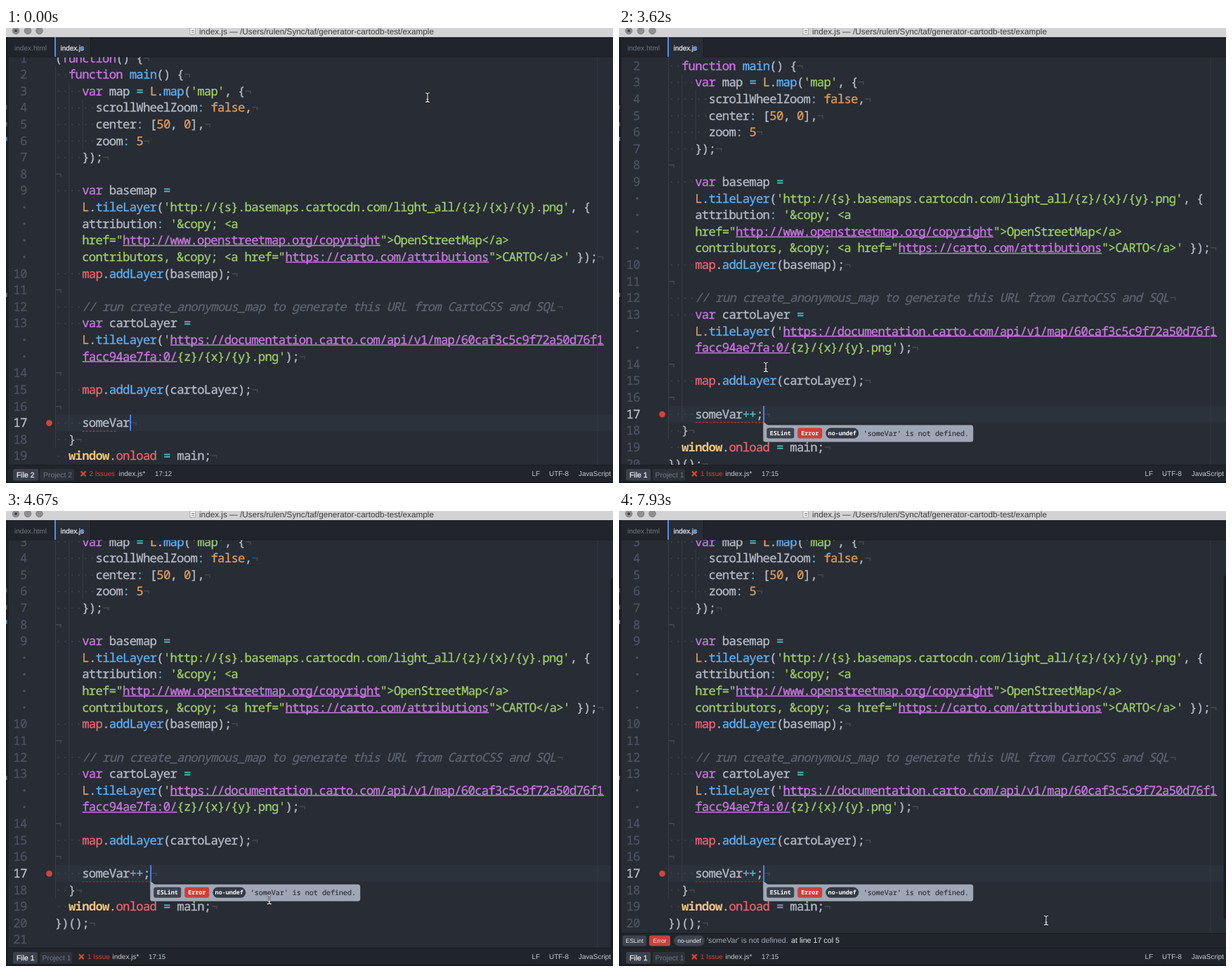
An HTML page that plays this animation: 864 by 648 pixels, repeating every 8000 ms.

```html
<!DOCTYPE html>
<html lang="en">
<head>
<meta charset="utf-8">
<title>Linting in an editor</title>
<style>
html, body { margin: 0; width: 100%; height: 100%; overflow: hidden; background: #282c34; }
svg { display: block; width: 864px; height: 648px; }
text { white-space: pre; text-rendering: geometricPrecision; font-family: "Liberation Sans", Arial, sans-serif; }
.code { font: 500 17.3px "Noto Sans Mono", "DejaVu Sans Mono", monospace; letter-spacing: -0.735px; stroke-width: .35px; }
.note { font-style: italic; }
.strong { font-weight: 700; stroke-width: 0; }
.mono { font-family: "Noto Sans Mono", "DejaVu Sans Mono", monospace; }
</style>
</head>
<body>
<svg id="stage" viewBox="0 0 864 648" xmlns="http://www.w3.org/2000/svg"></svg>
<script>
const NS = "http://www.w3.org/2000/svg";
const LOOP = 8000, COL = 9.645, LEFT = 70, ROW = 23.62, TOP = 42.6, ACTIVE = 22;
const INK = { w: "#b4bbc7", p: "#c678dd", b: "#61afef", c: "#56b6c2", g: "#9dcb6c",
  o: "#da9c60", r: "#e9656f", y: "#ecc47b", k: "#5c6370", u: "#c678dd" };
const STYLE = { k: "code note", y: "code strong" };
const FAINT = "#424852";

function add(parent, tag, attrs, content) {
  const el = document.createElementNS(NS, tag);
  for (const k in attrs) el.setAttribute(k, attrs[k]);
  if (content !== undefined) el.textContent = content;
  parent.appendChild(el);
  return el;
}
const rect = (p, x, y, width, height, fill, rx = 0) => add(p, "rect", { x, y, width, height, fill, rx });
const label = (p, x, y, size, fill, str, extra) => add(p, "text", { x, y, "font-size": size, fill, ...extra }, str);
const line = (p, x1, y1, x2, y2, stroke, w = 1) => add(p, "line", { x1, y1, x2, y2, stroke, "stroke-width": w });
const show = (el, on) => el.setAttribute("display", on ? "inline" : "none");
const move = (el, x, y) => el.setAttribute("transform", `translate(${x} ${y})`);
const colX = c => LEFT + c * COL;
const rowY = r => TOP + r * ROW;

// Each row: line number (0 = soft wrap), indent, text with ^x colour switches
const rows = [
  [1, 0, "^w(^pfunction^w() {"],
  [2, 2, "^pfunction ^bmain^w() {"],
  [3, 4, "^pvar^w map ^c= ^oL^w.^bmap^w(^g'map'^w, {"],
  [4, 6, "^wscrollWheelZoom^c: ^ofalse^w,"],
  [5, 6, "^wcenter^c:^w [^o50^w, ^o0^w],"],
  [6, 6, "^wzoom^c: ^o5"],
  [7, 4, "^w});"],
  [8, 0, ""],
  [9, 4, "^pvar^w basemap ^c="],
  [0, 4, "^oL^w.^btileLayer^w(^g'http://{s}.basemaps.cartocdn.com/light_all/{z}/{x}/{y}.png'^w, {"],
  [0, 4, "^wattribution^c: ^g'&copy; <a"],
  [0, 4, "^ghref=\"^uhttp://www.openstreetmap.org/copyright^g\">OpenStreetMap</a>"],
  [0, 4, "^gcontributors, &copy; <a href=\"^uhttps://carto.com/attributions^g\">CARTO</a>'^w });"],
  [10, 4, "^rmap^w.^baddLayer^w(basemap);"],
  [11, 0, ""],
  [12, 4, "^k// run create_anonymous_map to generate this URL from CartoCSS and SQL"],
  [13, 4, "^pvar^w cartoLayer ^c="],
  [0, 4, "^oL^w.^btileLayer^w(^g'^uhttps://documentation.carto.com/api/v1/map/60caf3c5c9f72a50d76f1"],
  [0, 4, "^ufacc94ae7fa:0/^g{z}/{x}/{y}.png'^w);"],
  [14, 0, ""],
  [15, 4, "^rmap^w.^baddLayer^w(cartoLayer);"],
  [16, 0, ""],
  [17, 4, "^wsomeVar"],
  [18, 2, "^w}"],
  [19, 2, "^ywindow^w.^ronload^w ^c=^w main;"],
  [20, 0, "^w})();"],
  [21, 0, ""]
];

const svg = document.getElementById("stage");
rect(svg, 0, 0, 864, 648, "#282c34");
const doc = add(svg, "g", {});

function code(p, col, y, ink, str) {
  const fill = INK[ink] || ink;
  if (ink === "u") line(p, colX(col), y + 7.4, colX(col + str.length), y + 7.4, fill, 1.5);
  return add(p, "text", { class: STYLE[ink] || "code", x: colX(col) - .35, y: y + 5.9, fill, stroke: fill }, str);
}

rect(doc, LEFT + 1, rowY(ACTIVE) - ROW / 2, 794, ROW, "#2c323b");
for (const [col, from, to] of [[0, 1, 23], [2, 2, 22], [4, 3, 5]])
  line(doc, colX(col) + .5, rowY(from) - ROW / 2, colX(col) + .5, rowY(to) + ROW / 2, "#393e47");

rows.forEach(([num, indent, src], i) => {
  const y = rowY(i);
  if (num) code(doc, (30 - LEFT) / COL - String(num).length, y, num === 17 ? "#b9c0cb" : "#4b5261", num);
  else add(doc, "circle", { cx: 26, cy: y, r: 1.8, fill: "#4b5261" });
  if (num) for (let c = 0; c < indent; c++)
    add(doc, "circle", { cx: colX(c + .5), cy: y + .3, r: 1, fill: FAINT });
  let col = indent;
  for (const run of src.split("^").slice(1)) {
    code(doc, col, y, run[0], run.slice(1));
    col += run.length - 1;
  }
  const next = rows[i + 1];
  if (next && next[0] && i !== ACTIVE) code(doc, col, y, FAINT, "¬");
});

const activeY = rowY(ACTIVE);
const plus = code(doc, 11, activeY, "c", "");
const semi = code(doc, 13, activeY, "w", ";");
const eol = code(doc, 11, activeY, FAINT, "¬");
add(doc, "circle", { cx: 61.5, cy: activeY + .3, r: 4.4, fill: "#d1453d" });
const dash = line(doc, colX(4), activeY + 12, 158, activeY + 12, "#c8453f", 1);
dash.setAttribute("stroke-dasharray", "3 2");
const caret = rect(doc, 0, activeY - 11.6, 1.7, 23, "#528bff");

function tip(rule, message) {
  const g = add(doc, "g", {}), w = rule.length * 5 + 7, mx = 96 + w;
  const y = activeY + 15.6;
  const tag = (x, width, fill, rx, str) => {
    rect(g, x, y + 4.2, width, 15, fill, rx);
    label(g, x + width / 2, y + 14.7, 8.4, "#fff",
      str, { class: "mono", "text-anchor": "middle", "font-weight": 600 });
  };
  add(g, "path", { d: `M0 ${y - 5}L0 ${y + 6}L10 ${y + 6}L7.5 ${y + 1}Z`, fill: "#9fa7b6" });
  rect(g, 0, y, mx + message.length * 6.02 + 5.5, 24, "#9fa7b6", 3.5);
  tag(5, 39, "#3c434e", 3, "ESLint");
  tag(49, 35, "#cc403b", 3, "Error");
  tag(89, w, "#343a45", 7.5, rule);
  label(g, mx - .5, y + 15.3, 10.03, "#2b303a", message,
    { class: "mono", stroke: "#2b303a", "stroke-width": .2 });
  return g;
}
const tipUndef = tip("no-undef", "'someVar' is not defined.");
const tipSemi = tip("semi", "Missing semicolon.");

// Fixed window parts
line(svg, 842, 41, 842, 622, "#343942");
const thumb = rect(svg, 860.5, 95, 5, 527, "#1a1d22", 2);
rect(svg, 0, 13, 3.5, 635, "#1b1e23");
for (const [y, fill] of [[110, "#4a505b"], [134, "#5a606b"], [155, "#4f86c4"], [377, "#6a707b"]])
  rect(svg, 0, y, 1.6, 6, fill);

rect(svg, 3, 13, 861, 28, "#21252b");
rect(svg, 70, 13, 50, 29, "#282c34");
line(svg, 3, 41, 69, 41, "#181a1f");
line(svg, 120, 41, 864, 41, "#181a1f");
line(svg, 120.5, 13, 120.5, 41, "#181a1f");
rect(svg, 69, 13, 2, 28, "#568af2");
label(svg, 12, 31.5, 10.1, "#6f7682", "index.html");
label(svg, 77.5, 31.5, 9.9, "#dfe2e8", "index.js", { stroke: "#dfe2e8", "stroke-width": .3 });
add(svg, "circle", { cx: 108.5, cy: 28.5, r: 2.8, fill: "#568af2", opacity: .7 });

rect(svg, 0, 0, 864, 13, "#d3d2d4");
for (const x of [14, 31, 47.5])
  add(svg, "circle", { cx: x, cy: 4, r: 4.8, fill: "#8f8f91", stroke: "#757577", "stroke-width": .8 });
add(svg, "circle", { cx: 14, cy: 4, r: 2, fill: "#444" });
add(svg, "rect", { x: 262, y: 0, width: 7.5, height: 9, fill: "#f4f4f4", stroke: "#999", "stroke-width": .8 });
line(svg, 264, 3.5, 268, 3.5, "#777");
line(svg, 264, 6, 268, 6, "#777");
label(svg, 275, 8.6, 11.74, "#3c3c3e", "index.js — /Users/rulen/Sync/taf/generator-cartodb-test/example");

const panel = add(svg, "g", {});
rect(panel, 3.5, 601, 861, 21, "#21252b");
line(panel, 3.5, 601.5, 864, 601.5, "#181a1f");
for (const [x, w, fill, rx, str] of [[5, 34, "#3c434e", 3, "ESLint"], [43, 30, "#cc403b", 3, "Error"],
  [78, 44, "#3c434e", 7.5, "no-undef"]]) {
  rect(panel, x, 604.5, w, 15, fill, rx);
  label(panel, x + w / 2, 615.2, 8.5, "#eceef2", str, { "text-anchor": "middle" });
}
label(panel, 125, 614.5, 10.7, "#a3abb8", "'someVar' is not defined.");
label(panel, 245, 614.5, 10.7, "#e8ebf0", "at line 17 col 5");

rect(svg, 3.5, 622, 861, 26, "#21252b");
line(svg, 3.5, 622.5, 864, 622.5, "#181a1f");
rect(svg, 0, 646.3, 864, 1.7, "#15171b");
const fileBox = rect(svg, 10, 628, 36, 16.5, "#3b414c", 2);
const projBox = rect(svg, 48, 628, 49, 16.5, "#2c313a", 2);
const fileText = label(svg, 15, 639.7, 10.4, "#eef0f4", "", { stroke: "#eef0f4", "stroke-width": .25 });
const projText = label(svg, 52.5, 639.7, 10.4, "#727987", "");
const cross = add(svg, "path", { d: "M-3.4-3.4L3.4 3.4M3.4-3.4L-3.4 3.4", stroke: "#e0413b", "stroke-width": 2.2 });
const issues = label(svg, 0, 638.3, 9.8, "#e0413b", "");
const fileName = label(svg, 0, 638.3, 10, "#c3c8d1", "index.js*");
const place = label(svg, 0, 638.3, 9.7, "#c3c8d1", "");
for (const [x, str] of [[748.5, "LF"], [773, "UTF-8"], [815, "JavaScript"]])
  label(svg, x, 638.3, 9.9, "#c3c8d1", str);

// Mouse pointers
const mouse = add(svg, "g", {});
const beam = add(mouse, "g", { fill: "none" });
for (const [stroke, w] of [["#15171b", 2.6], ["#f2f2f2", 1.1]])
  add(beam, "path", { d: "M-3-6.5Q0-6.5 0-4.5Q0-6.5 3-6.5M0-5V5M-3 6.5Q0 6.5 0 4.5Q0 6.5 3 6.5M-1.5 2.5H1.5",
    stroke, "stroke-width": w });
const edge = { fill: "#111", stroke: "#f4f4f4", "stroke-width": 1 };
const arrow = add(mouse, "path", { d: "M0 0V13L3 10.2L5 15L7.2 14L5.2 9.6H9.2Z", ...edge });
const hand = add(mouse, "path", { d: "M-1.5 7V1Q0-1.2 1.5 1V5Q3 4 4 5.5Q5.5 4.7 6.5 6.3Q8.5 6 8.5 8V12L7 16H0L-4 10Q-4.6 7.5-2.8 8Z",
  fill: "#f6f6f6", stroke: "#111", "stroke-width": 1 });

const mousePath = [[2150, 600, 99], [2660, 232, 415], [2960, 212, 468], [3250, 209, 483], [4250, 209, 483],
  [4670, 375, 553], [4800, 345, 575], [5080, 165, 630], [5170, 120, 630], [5450, 40, 639], [5600, 37, 641],
  [6500, 37, 641], [6760, 44, 636], [7100, 110, 630], [7500, 234, 628], [7760, 536, 537], [7930, 608, 583]];
const scrollPath = [[3480, 0], [3710, 20.3], [3800, 45.2], [4050, 45.2], [4180, 46.2]];

function along(path, t) {
  if (t <= path[0][0]) return path[0].slice(1);
  for (let i = 1; i < path.length; i++) {
    const a = path[i - 1], b = path[i];
    if (t < b[0]) {
      const k = (t - a[0]) / (b[0] - a[0]);
      return a.slice(1).map((v, j) => v + (b[j + 1] - v) * k);
    }
  }
  return path[path.length - 1].slice(1);
}

function caretOn(t) {
  if (t < 2340) return t < 500 || t >= 860;
  return Math.floor((t - 2340) / 400) % 2 === 1;
}

function draw(t) {
  const typed = [1210, 1300, 1830].filter(at => t >= at).length;
  const end = colX(11 + typed);
  plus.textContent = "+".repeat(Math.min(typed, 2));
  show(semi, typed === 3);
  eol.setAttribute("x", end + .6);
  caret.setAttribute("x", end + .2);
  show(caret, caretOn(t));

  const dashEnd = t < 360 ? 158 : t < 1650 ? 176 : t < 2190 ? 196 : 205;
  dash.setAttribute("x2", dashEnd);
  dash.setAttribute("opacity", t < 3800 ? 1 : .65);
  show(tipUndef, (t >= 500 && t < 1210) || t >= 2190);
  show(tipSemi, t >= 1300 && t < 1920);
  move(tipUndef, end + .2, 0);
  move(tipSemi, end + .2, 0);
  move(doc, 0, -along(scrollPath, t)[0]);

  const open = t >= 6300;
  show(panel, open);
  show(thumb, t >= 4420);
  thumb.setAttribute("y", open ? 92 : 95);
  thumb.setAttribute("height", open ? 489 : 527);

  const count = t < 2190 ? 2 : 1, shift = count === 1 ? 9 : 0;
  fileText.textContent = "File " + count;
  projText.textContent = "Project " + count;
  fileBox.setAttribute("width", count === 2 ? 36 : 35);
  projBox.setAttribute("width", count === 2 ? 49 : 46);
  projText.setAttribute("x", count === 2 ? 53 : 51.5);
  issues.textContent = count === 2 ? "2 Issues" : "1 Issue";
  issues.setAttribute("x", count === 2 ? 118.5 : 116);
  move(cross, count === 2 ? 110 : 107.3, 634.8);
  fileName.setAttribute("x", 160.5 - shift);
  place.setAttribute("x", 212 - shift);
  place.textContent = "17:" + (12 + typed);

  const [x, y] = along(mousePath, t);
  const onButton = y > 634 && x < 97, inBar = y > (open ? 602 : 622);
  move(mouse, x, y);
  show(hand, onButton);
  show(arrow, inBar && !onButton);
  show(beam, !inBar);
}

const start = performance.now();
function tick() {
  draw((performance.now() - start) % LOOP);
  requestAnimationFrame(tick);
}
draw(0);
requestAnimationFrame(tick);
</script>
</body>
</html>
```
